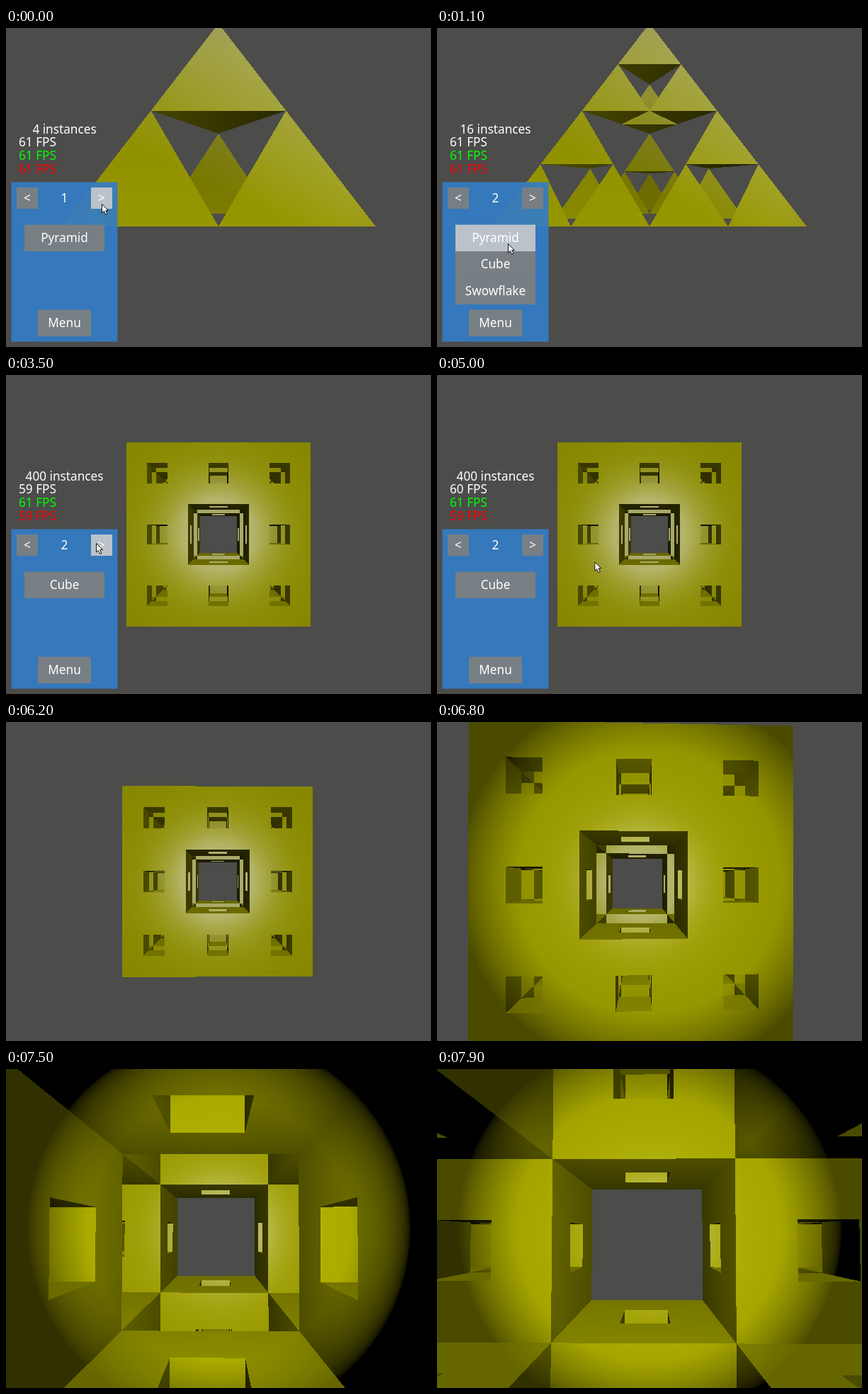
An HTML page with a canvas for the animation above (8 s loop, 600 by 450 pixels).

```html
<!DOCTYPE html>
<html lang="en">
<head>
<meta charset="utf-8">
<title>Fractal viewer</title>
<style>
  html, body { margin: 0; width: 600px; height: 450px; overflow: hidden; background: #4c4c4b; }
  canvas, svg { position: absolute; left: 0; top: 0; display: block; }
  text { font: 17.2px "Noto Sans", "Open Sans", sans-serif; fill: #fff; }
  .mid { text-anchor: middle; }
</style>
</head>
<body>
<canvas id="view" width="600" height="450"></canvas>
<svg id="ui" width="600" height="450" viewBox="0 0 600 450"></svg>
<script>
const W = 600, H = 450, FOCAL = 389.7, LOOP = 8000, STEP = 100, GAMMA = 2.2;
// directional light per axis in linear light, y points down
const SUN = [48, -102, -75].map(v => Math.sign(v) * Math.abs(v) ** GAMMA);
const LAMP = 120000;
const ctx = document.getElementById('view').getContext('2d');
const ui = document.getElementById('ui');
const img = ctx.createImageData(W, H);
const depth = new Float32Array(W * H);

// time, x, y of the pointer tip
const POINTER = [
  [600, 135, 248], [900, 100, 304], [1100, 100, 304], [1300, 98, 338], [1400, 98, 338],
  [1700, 98, 362], [1800, 98, 362], [2200, 100, 330], [2400, 100, 330], [2900, 127, 237],
  [3800, 127, 237], [4200, 170, 265], [4300, 170, 265], [4700, 207, 264], [4900, 207, 264],
  [5200, 253, 262]
];
// time, distance to front face, cube offset x y, view turn x y in pixels
const CAMERA = [
  [6100, 1.5, 0, 0, 0, 0], [6200, 1.449, 0, 0, -1, 0], [6800, 0.852, -0.02, 0.008, -12.8, 1.3],
  [7200, 0.452, -0.021, 0.0093, 1.6, 4], [7900, -0.166, -0.016, 0.0265, 4, 10]
];
// time, shape, level, instances
const SCENES = [
  [0, 'Pyramid', 1, 4], [400, 'Pyramid', 2, 16], [2300, 'Cube', 0, 1],
  [3100, 'Cube', 1, 20], [3500, 'Cube', 2, 400]
];
const FPS = [[0, 61, 61, 61], [3100, 59, 61, 59], [3900, 60, 61, 59]];

const clamp = (v, lo, hi) => Math.min(hi, Math.max(lo, v));
const current = (table, t) => table.filter(row => row[0] <= t).pop();

function tween(table, t) {
  const n = table.findIndex(row => row[0] > t);
  if (n === 0) return table[0].slice(1);
  if (n < 0) return table[table.length - 1].slice(1);
  const a = table[n - 1], b = table[n], k = (t - a[0]) / (b[0] - a[0]);
  return a.slice(1).map((v, i) => v + (b[i + 1] - v) * k);
}

function put(i, light, shine) {
  const px = img.data, warm = light + 0.36 * shine;
  px[i * 4] = warm;
  px[i * 4 + 1] = warm;
  px[i * 4 + 2] = shine;
}

function clear() {
  const px = img.data;
  for (let i = 0; i < px.length; i += 4) {
    px[i] = px[i + 1] = 76;
    px[i + 2] = 75;
    px[i + 3] = 255;
  }
  depth.fill(1e9);
}

// cone of the lamp carried by the viewer, fading between two angles
function spotAt(x, y) {
  const cos = FOCAL / Math.sqrt(x * x + y * y + FOCAL * FOCAL);
  return clamp((cos - 0.821) / 0.081, 0, 1);
}

// ---- pyramid ----
const cross = (a, b) => [a[1] * b[2] - a[2] * b[1], a[2] * b[0] - a[0] * b[2], a[0] * b[1] - a[1] * b[0]];
const sub = (a, b) => a.map((v, i) => v - b[i]);
const mid = (a, b) => a.map((v, i) => (v + b[i]) / 2);

function triangle(a, b, c, front) {
  const pts = [a, b, c];
  const xs = pts.map(p => W / 2 + p[0] * FOCAL / p[2]);
  const ys = pts.map(p => H / 2 + p[1] * FOCAL / p[2]);
  const x0 = clamp(Math.floor(Math.min(...xs)), 0, W), x1 = clamp(Math.ceil(Math.max(...xs)), 0, W);
  const y0 = clamp(Math.floor(Math.min(...ys)), 0, H), y1 = clamp(Math.ceil(Math.max(...ys)), 0, H);
  const n = cross(sub(b, a), sub(c, a));
  const plane = n[0] * a[0] + n[1] * a[1] + n[2] * a[2];
  const edges = [cross(a, b), cross(b, c), cross(c, a)];
  for (let y = y0; y < y1; y++) for (let x = x0; x < x1; x++) {
    const dx = x + 0.5 - W / 2, dy = y + 0.5 - H / 2;
    const side = e => e[0] * dx + e[1] * dy + e[2] * FOCAL >= 0;
    const s = side(edges[0]);
    if (side(edges[1]) !== s || side(edges[2]) !== s) continue;
    const z = plane / (n[0] * dx + n[1] * dy + n[2] * FOCAL) * FOCAL, i = y * W + x;
    if (z <= 0 || z >= depth[i]) continue;
    depth[i] = z;
    if (front) {
      const dim = 0.85 + 0.15 * Math.sqrt(spotAt(dx, dy));
      put(i, (205 - 62 * z) * dim, clamp(0.38 * (200 - y) + 0.2 * (x - 250), 0, 100));
    } else {
      put(i, clamp(60 - 0.15 * (x - 260), 25, 75), 0);
    }
  }
}

function pyramid(level, top, left, right, back) {
  if (level === 0) {
    triangle(left, right, top, true);
    triangle(left, right, back, false);
    return;
  }
  const corners = [top, left, right, back];
  for (const c of corners) pyramid(level - 1, ...corners.map(p => mid(c, p)));
}

// ---- cube ----
function sponge(level) {
  const grid = new Uint8Array(729);
  const open = (...d) => d.filter(v => v === 1).length > 1;
  for (let i = 0; i < 729; i++) {
    const x = i % 9, y = Math.floor(i / 9) % 9, z = Math.floor(i / 81);
    const big = level > 0 && open(Math.floor(x / 3), Math.floor(y / 3), Math.floor(z / 3));
    const small = level > 1 && open(x % 3, y % 3, z % 3);
    grid[i] = big || small ? 0 : 1;
  }
  return grid;
}
const SPONGES = [0, 1, 2].map(sponge);

function cube(level, [dist, ox, oy, turnX, turnY]) {
  const grid = SPONGES[level];
  const org = [(0.5 - ox) * 9, (0.5 - oy) * 9, -dist * 9];
  const dir = [0, 0, 0], cell = [0, 0, 0], step = [0, 0, 0], next = [0, 0, 0], gap = [0, 0, 0];

  for (let y = 0; y < H; y++) for (let x = 0; x < W; x++) {
    const sx = x + 0.5 - W / 2, sy = y + 0.5 - H / 2;
    dir[0] = (sx - turnX) * 9 || 1e-6;
    dir[1] = (sy - turnY) * 9 || 1e-6;
    dir[2] = (FOCAL + (turnX * sx + turnY * sy) / FOCAL) * 9;

    let t = 0, far = 1e9, axis = -1;
    for (let a = 0; a < 3; a++) {
      step[a] = dir[a] > 0 ? 1 : -1;
      const t0 = ((dir[a] > 0 ? 0 : 9) - org[a]) / dir[a];
      const t1 = ((dir[a] > 0 ? 9 : 0) - org[a]) / dir[a];
      if (t0 > t) { t = t0; axis = a; }
      if (t1 < far) far = t1;
    }
    if (t >= far) continue;
    for (let a = 0; a < 3; a++) {
      cell[a] = a === axis ? (step[a] > 0 ? 0 : 8) : clamp(Math.floor(org[a] + dir[a] * t), 0, 8);
      next[a] = (cell[a] + (step[a] > 0 ? 1 : 0) - org[a]) / dir[a];
      gap[a] = Math.abs(1 / dir[a]);
    }
    let hit = true;
    while (!grid[cell[0] + cell[1] * 9 + cell[2] * 81]) {
      axis = next[0] < next[1] ? (next[0] < next[2] ? 0 : 2) : (next[1] < next[2] ? 1 : 2);
      t = next[axis];
      next[axis] += gap[axis];
      cell[axis] += step[axis];
      if (cell[axis] < 0 || cell[axis] > 8) { hit = false; break; }
    }
    if (!hit || axis < 0) continue;

    // lights add up in linear light, then get display gamma
    const len = Math.sqrt(dir[0] * dir[0] + dir[1] * dir[1] + dir[2] * dir[2]);
    const facing = Math.abs(dir[axis]) / len, spot = spotAt(sx, sy);
    const lamp = LAMP / (1 + 1.28 * t * len / 9) * Math.pow(facing, 1.2) * spot;
    const sun = Math.max(0, -step[axis] * SUN[axis]);
    const shine = 180 * Math.pow(Math.max(0, 2 * facing * facing - 1), 16) * spot;
    put(y * W + x, Math.pow(sun + lamp, 1 / GAMMA), Math.min(105, shine));
  }
}

// ---- interface ----
const label = (x, y, s, attr = 'class="mid"') => `<text x="${x}" y="${y}" ${attr}>${s}</text>`;

function drawUi(t, shape, level, count) {
  if (t >= 5500) return '';
  const [mx, my] = tween(POINTER, t);
  const [, now, best, worst] = current(FPS, t);
  const button = (x, y, w, h, s) => {
    const over = mx >= x && mx < x + w && my >= y && my < y + h;
    return `<rect x="${x}" y="${y}" width="${w}" height="${h}" fill="${over ? '#bbc2c9' : '#787f84'}"/>` +
      label(x + w / 2, y + h / 2 + 5.7, s);
  };
  const open = t >= 1100 && t < 2300;
  const choices = open ? ['Pyramid', 'Cube', 'Swowflake'] : [shape];
  return label(82.5, 148.5, count + ' instances') +
    label(18, 167.3, now + ' FPS', '') +
    label(18, 186.3, best + ' FPS', 'style="fill:#0f0"') +
    label(18, 205.3, worst + ' FPS', 'style="fill:#f00"') +
    '<rect x="7.5" y="217.5" width="150" height="225" fill="rgb(52,124,196)" fill-opacity=".93"/>' +
    button(15, 225, 30, 30, '&lt;') + label(82.5, 245.7, level) + button(120, 225, 30, 30, '&gt;') +
    choices.map((s, i) => button(26, 277.5 + i * 37.5, 113, 37.5, s)).join('') +
    button(45, 397.5, 75, 37.5, 'Menu') +
    `<path transform="translate(${mx} ${my})" d="M.5 .5V13L3.4 10.3L5.6 15.3L7.9 14.3L5.7 9.5H9.4Z" fill="#fff" stroke="#111"/>`;
}

let shown = '', drawn = -1;

function render(t) {
  const [, shape, level, count] = current(SCENES, t);
  const cam = tween(CAMERA, t);
  const key = [shape, level, ...cam].join();
  if (key !== shown) {
    clear();
    if (shape === 'Cube') cube(level, cam);
    else pyramid(level, [0, -0.6925, 1.1664], [-0.5, 0.124, 0.8777], [0.5, 0.124, 0.8777], [0, 0.124, 1.7437]);
    ctx.putImageData(img, 0, 0);
    shown = key;
  }
  ui.innerHTML = drawUi(t, shape, level, count);
}

const start = performance.now();
function tick() {
  const t = Math.floor((performance.now() - start) % LOOP / STEP) * STEP;
  if (t !== drawn) {
    drawn = t;
    render(t);
  }
  requestAnimationFrame(tick);
}
tick();
</script>
</body>
</html>
```
